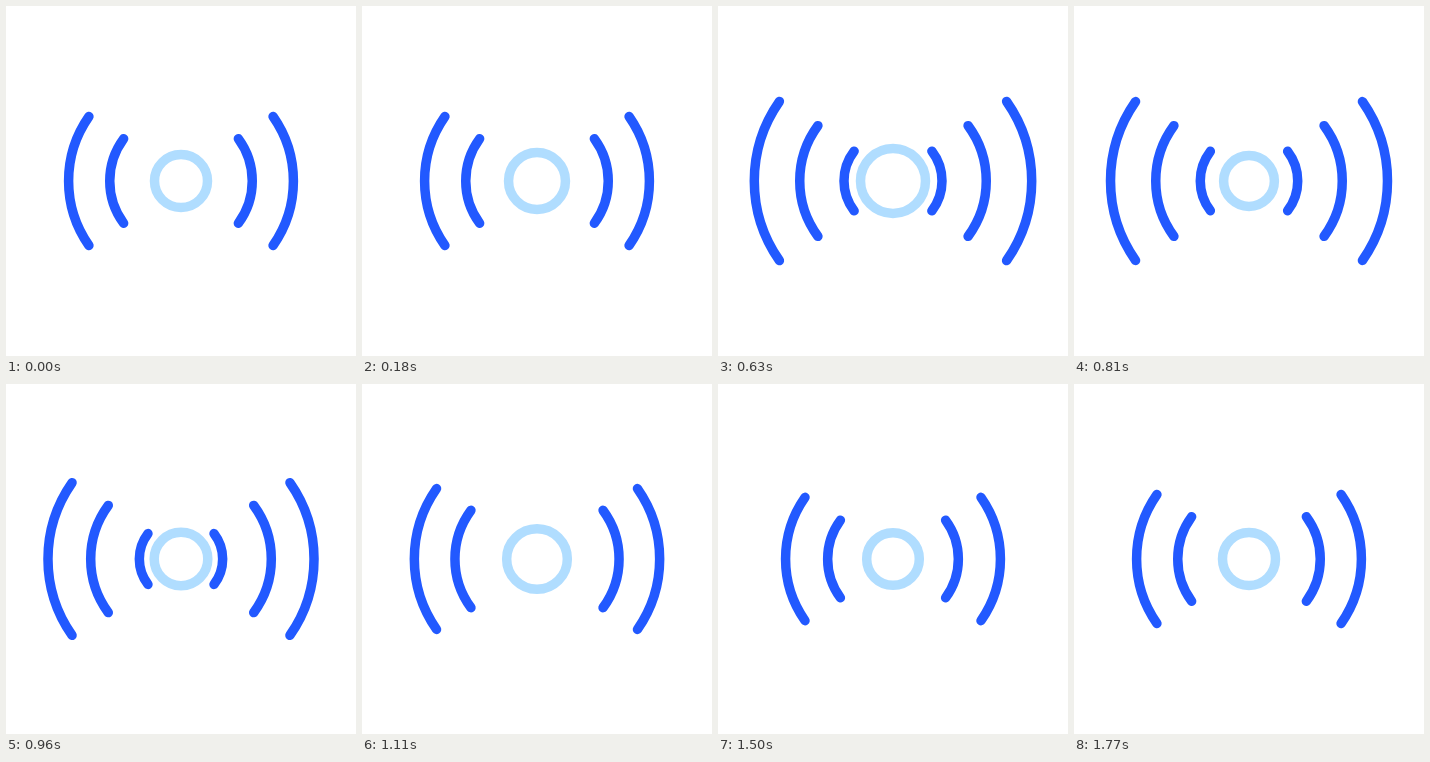
Animation, 350 px wide and 350 px high, one loop 1910 ms. Source, as an HTML page with a canvas:

```html
<!DOCTYPE html>
<html lang="en">
<head>
<meta charset="utf-8">
<title>Pulse</title>
<style>
  html, body { margin: 0; width: 100%; height: 100%; overflow: hidden; background: #fff; }
  canvas { display: block; width: 350px; height: 350px; }
</style>
</head>
<body>
<canvas id="stage" width="350" height="350"></canvas>
<script>
const ctx = document.getElementById('stage').getContext('2d');
const LOOP = 1910, STEP = 30, LAST = 1770;
const MID = 175, LINE = 9.5;
const BLUE = '#2259ff', PALE = '#b0ddff';

// Radii at rest, at the outward peak, while held, and at the inward dip.
const waves = [
  { rest: 112.4, peak: 149, hold: 138.7, dip: 107, spread: 0.611, rise: 0, fall: 0 },
  { rest: 71.25, peak: 103.5, hold: 93.25, dip: 65.3, spread: 0.635, rise: 9, fall: 45 },
  { rest: 25.2, peak: 58, hold: 49, dip: 8, spread: 0.655, rise: 5, fall: 0 }
];

const ringKeys = [[0, 26.5], [540, 34.3], [850, 25], [1130, 30.4], [1450, 26.3], [1770, 26.5]];

const ease = u => (1 - Math.cos(Math.PI * u)) / 2;

// Keys are [time, value, power]; power above 1 delays the move into that key.
function valueAt(keys, t) {
  if (t <= keys[0][0]) return keys[0][1];
  for (let i = 1; i < keys.length; i++) {
    const [t0, v0] = keys[i - 1];
    const [t1, v1, power = 1] = keys[i];
    if (t <= t1) return v0 + (v1 - v0) * ease(((t - t0) / (t1 - t0)) ** power);
  }
  return keys[keys.length - 1][1];
}

function waveKeys(w) {
  return [
    [180 + w.rise, w.rest],
    [490 + w.rise, w.peak, 2.5],
    [630, w.hold],
    [775 + w.fall, w.hold],
    [1440 + w.fall, w.dip],
    [1770, w.rest]
  ];
}

const tracks = waves.map(w => ({ keys: waveKeys(w), spread: w.spread }));

function strokeArc(r, from, to) {
  ctx.beginPath();
  ctx.arc(MID, MID, r, from, to);
  ctx.stroke();
}

function draw(t) {
  ctx.fillStyle = '#fff';
  ctx.fillRect(0, 0, 350, 350);
  ctx.lineWidth = LINE;
  ctx.lineCap = 'round';

  ctx.strokeStyle = BLUE;
  for (const { keys, spread } of tracks) {
    const r = valueAt(keys, t);
    strokeArc(r, -spread, spread);
    strokeArc(r, Math.PI - spread, Math.PI + spread);
  }

  const r = valueAt(ringKeys, t);
  ctx.strokeStyle = PALE;
  ctx.beginPath();
  ctx.arc(MID, MID, r, 0, 2 * Math.PI);
  ctx.fill();
  ctx.stroke();
}

const start = performance.now();

function tick() {
  const t = (performance.now() - start) % LOOP;
  draw(Math.min(Math.floor(t / STEP) * STEP, LAST));
  requestAnimationFrame(tick);
}
tick();
</script>
</body>
</html>
```
